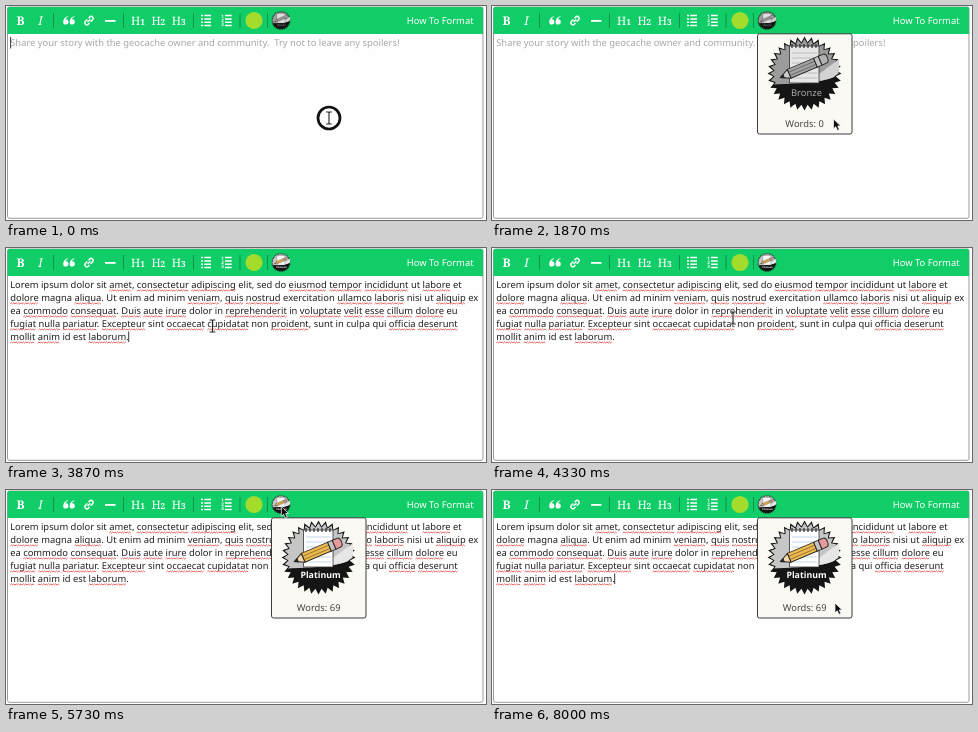
Animation of 480x214 px, one loop 8.07 s. Source, as an HTML page:

```html
<!DOCTYPE html>
<html lang="en">
<head>
<meta charset="utf-8">
<title>Log editor</title>
<style>
html, body { margin: 0; width: 100%; height: 100%; overflow: hidden; background: #fff; }
svg { display: block; width: 480px; height: 214px; }
text { font-family: "Noto Sans", sans-serif; font-size: 9.38px; white-space: pre; text-rendering: geometricPrecision; }
.serif { font-family: "Noto Serif", serif; }
.line { fill: none; stroke: #fff; }
</style>
</head>
<body>
<svg viewBox="0 0 480 214">
  <defs>
    <clipPath id="face"><path d="M270 25H354V64C337 78 312 77 272 79Z"/></clipPath>
    <g id="arrow">
      <path d="M0 0V9.8L2.3 7.8L4 11.4L5.9 10.5L4.2 7H7.2Z" fill="#111" stroke="#fff" stroke-width=".7"/>
    </g>
    <g id="ibeam" fill="none">
      <path d="M-2.8 -6H-.7L0 -5.4L.7 -6H2.8M0 -5.4V5.4M-2.8 6H-.7L0 5.4L.7 6H2.8" stroke="#fff" stroke-width="2" opacity=".7"/>
      <path d="M-2.8 -6H-.7L0 -5.4L.7 -6H2.8M0 -5.4V5.4M-2.8 6H-.7L0 5.4L.7 6H2.8" stroke="#222" stroke-width="1.1"/>
    </g>
  </defs>

  <rect x="1.5" y="1" width="475.5" height="211.3" rx="2" fill="#fefefe" stroke="#9b9b9b"/>
  <path d="M1.5 28V2.5Q1.5 1 3 1H475.5Q477 1 477 2.5V28Z" fill="#10cd67"/>

  <g id="toolbar" fill="#fff">
    <path d="M47.5 7V22M117.5 7V22M187.5 7V22M234 7V22M261.5 7V22" stroke="#0b8d49" stroke-width=".9"/>
    <text class="serif" x="10.6" y="18.7" style="font-size:12px;font-weight:800">B</text>
    <text class="serif" x="32.3" y="18.7" style="font-size:12px;font-style:italic;font-weight:500">I</text>
    <g id="quote"><path d="M62 10.3C59 11 57.2 13.3 57.2 16A2.6 2.6 0 1 0 59.5 13.4C59.8 12.2 60.7 11.4 62.2 11Z"/></g>
    <use href="#quote" x="6.4"/>
    <g class="line" stroke-width="1.4" transform="translate(83 14.6) rotate(-45)">
      <path d="M-.3 -2H-3A2 2 0 0 0 -3 2H-1.3M.3 2H3A2 2 0 0 0 3 -2H1.3M-2 0H2"/>
    </g>
    <path d="M99 14H109.5V15.8H99Z"/>
    <g id="heads"></g>
    <g id="lists"></g>
    <circle cx="248" cy="14.5" r="8.6" fill="#a4dc2c"/>
    <text x="400.8" y="18">How To Format</text>
  </g>

  <text id="hint" x="4.2" y="40" fill="#a8a8a8">Share your story with the geocache owner and community.  Try not to leave any spoilers!</text>
  <g id="story" fill="#222"></g>
  <path id="caret" stroke="#222" stroke-width=".9"/>

  <g id="smallIcons"></g>
  <g id="popup">
    <rect x="265.5" y="27.8" width="94.5" height="100.2" rx="2" fill="#faf9f4" stroke="#3c3c3c"/>
    <g id="badges"></g>
    <text id="words" x="312.6" y="121" text-anchor="middle" fill="#444"></text>
  </g>

  <circle id="ring" r="11" fill="none" stroke="#111" stroke-width="2.7"/>
  <use id="beam" href="#ibeam"/>
  <use id="pointer" href="#arrow"/>
</svg>
<script>
const LOOP = 8070, PASTE = 3870;
const $ = id => document.getElementById(id);
const show = (id, on) => $(id).setAttribute('visibility', on ? 'visible' : 'hidden');

// Toolbar headings and lists
$('heads').innerHTML = [1, 2, 3].map(n => {
  const x = 104.8 + n * 20.3;
  return `<text class="serif" x="${x}" y="18.6" style="font-size:11.6px">H</text>
    <text class="serif" x="${x + 9.2}" y="18.6" style="font-size:8.4px;font-weight:600">${n}</text>`;
}).join('');

const rows = [9.6, 12.9, 16.2, 19.5];
$('lists').innerHTML = rows.map((y, i) => `
  <path class="line" stroke-width="1.5" d="M195 ${y}H197M198.3 ${y}H205M219 ${y}H225.7"/>
  ${i < 3 ? `<text x="215.2" y="${12 + i * 4.2}" style="font-size:4.6px;font-weight:700">${i + 1}</text>` : ''}`).join('');

// Award badge
function seal(cx, cy, outer, inner, spikes) {
  const pts = [];
  for (let i = 0; i < spikes * 2; i++) {
    const r = i % 2 ? inner : outer, a = i * Math.PI / spikes - Math.PI / 2;
    pts.push((cx + r * Math.cos(a)).toFixed(2) + ',' + (cy + r * Math.sin(a)).toFixed(2));
  }
  return pts.join(' ');
}

function badge(c) {
  return `<polygon points="${seal(312.5, 67.5, 37, 31.5, 32)}" fill="#151515"/>
    <g clip-path="url(#face)">
      <polygon points="${seal(312.5, 67.5, 34.5, 30, 32)}" fill="${c.face}"/>
      <path d="M324 79L327 68L347 53V66Q338 76 324 79Z" fill="${c.shine}"/>
    </g>
    <path d="M297.5 40H327V77H297.5Z" fill="${c.paper}" stroke="#333" stroke-width=".8"/>
    <path d="M300 47H325M300 52H325M300 57H325M300 62H325M300 67H325M300 72H325" stroke="${c.rule}" stroke-width=".7"/>
    <path d="M300 38V42M304 38V42M308 38V42M312 38V42M316 38V42M320 38V42M324 38V42" stroke="#222" stroke-width="1.1"/>
    <g transform="translate(288.5 71.5) rotate(-23)" stroke="#222" stroke-width=".9">
      <path d="M0 0L9.5 -4.8V4.8Z" fill="${c.wood}"/>
      <path d="M0 0L3.4 -1.7V1.7Z" fill="#222"/>
      <path d="M9.5 -4.8H38V4.8H9.5Z" fill="${c.body}"/>
      <path d="M10 -1.6H38M10 1.8H38" stroke-width=".4"/>
      <path d="M38 -4.8H43V4.8H38Z" fill="#c4c4c4"/>
      <path d="M43 -4.8H48Q51 -4.8 51 0T48 4.8H43Z" fill="${c.rubber}"/>
    </g>
    <text x="314.5" y="${c.y}" text-anchor="middle" fill="${c.ink}" style="${c.font}">${c.name}</text>`;
}

const levels = {
  bronze: { name: 'Bronze', y: 90, ink: '#aaa', font: 'font:700 12.7px "Liberation Sans",sans-serif',
    face: '#9c9c9c', shine: '#d2d2d2', paper: '#e6e6e6', rule: '#aaa', wood: '#ccc', body: '#a2a2a2', rubber: '#b0b0b0' },
  platinum: { name: 'Platinum', y: 88, ink: '#fff', font: 'font-size:8.8px;font-weight:800',
    face: '#c6c6c6', shine: '#e6e6e6', paper: '#fff', rule: '#a9c4e4', wood: '#f3d9ad', body: '#edb94c', rubber: '#e39a98' }
};
for (const key in levels) {
  const art = badge(levels[key]);
  $('badges').innerHTML += `<g id="${key}">${art}</g>`;
  $('smallIcons').innerHTML += `<g id="${key}Icon" transform="translate(275 14.5) scale(.265) translate(-312.5 -67.5)">${art}</g>`;
}

// Pasted text with spelling marks
const lines = [
  'Lorem ipsum dolor sit amet, consectetur adipiscing elit, sed do eiusmod tempor incididunt ut labore et',
  'dolore magna aliqua. Ut enim ad minim veniam, quis nostrud exercitation ullamco laboris nisi ut aliquip ex',
  'ea commodo consequat. Duis aute irure dolor in reprehenderit in voluptate velit esse cillum dolore eu',
  'fugiat nulla pariatur. Excepteur sint occaecat cupidatat non proident, sunt in culpa qui officia deserunt',
  'mollit anim id est laborum.'
];
const known = new Set(('Lorem ipsum dolor sit elit sed do ut et magna Ut enim ad minim exercitation nisi ex ' +
  'ea in eu non sint sunt culpa qui id est').split(' '));

function squiggle(from, to, y) {
  let d = `M${from.toFixed(1)} ${y}`;
  for (let x = from + 1.2, up = 1; x < to; x += 1.2, up = 1 - up) d += `L${x.toFixed(1)} ${y - up * 1.1}`;
  return `<path d="${d}" fill="none" stroke="#e23b35" stroke-width=".8"/>`;
}

$('story').innerHTML = lines.map((s, i) => `<text x="4.2" y="${40 + i * 13}">${s}</text>`).join('');
let marks = '';
[...$('story').children].forEach((el, i) => {
  for (const m of lines[i].matchAll(/\w+/g)) {
    if (known.has(m[0])) continue;
    const last = m.index + m[0].length - 1;
    marks += squiggle(el.getStartPositionOfChar(m.index).x, el.getEndPositionOfChar(last).x, 43 + i * 13);
  }
});
$('story').insertAdjacentHTML('beforeend', marks);

// Mouse path: time, x, y
const path = [
  [0, 323, 112], [200, 323, 112], [800, 275, 16], [1000, 275, 16], [1750, 341.5, 113],
  [2200, 341.5, 113], [3070, 206.5, 75], [3400, 206.5, 78], [3900, 206.5, 78], [4330, 241, 70],
  [5270, 273, 28], [5450, 275, 16], [5700, 275, 16], [6400, 336.5, 106.5], [6500, 336.5, 106.5],
  [7100, 343, 113], [LOOP, 343, 113]
];

function mouse(t) {
  const i = path.findIndex(p => p[0] > t), a = path[i - 1], b = path[i];
  const k = (t - a[0]) / (b[0] - a[0]), e = k * k * (3 - 2 * k);
  return [a[1] + (b[1] - a[1]) * e, a[2] + (b[2] - a[2]) * e];
}

function caretOn(t) {
  return t < PASTE ? t % 1200 < 600 : (t + 200) % 1000 < 500;
}

function draw(t) {
  const [x, y] = mouse(t);
  const pasted = t >= PASTE;
  const open = (t >= 740 && t < 2560) || t >= 5400;
  const arrow = open || y < 27;
  const at = `translate(${x.toFixed(2)} ${y.toFixed(2)})`;

  show('hint', !pasted);
  show('story', pasted);
  show('bronzeIcon', !pasted);
  show('platinumIcon', pasted);
  show('popup', open);
  show('bronze', open && !pasted);
  show('platinum', open && pasted);
  $('words').textContent = 'Words: ' + (pasted ? 69 : 0);

  $('caret').setAttribute('d', pasted ? 'M122.7 83.5V94' : 'M4.6 31V42.5');
  show('caret', caretOn(t));

  show('beam', !arrow);
  show('pointer', arrow);
  for (const id of ['beam', 'pointer', 'ring']) $(id).setAttribute('transform', at);
  show('ring', t < 200);
  $('ring').setAttribute('r', 11 * (1 - Math.max(0, t - 70) / 130));
}

const start = performance.now();
function tick() {
  draw((performance.now() - start) % LOOP);
  requestAnimationFrame(tick);
}
tick();
</script>
</body>
</html>
```
